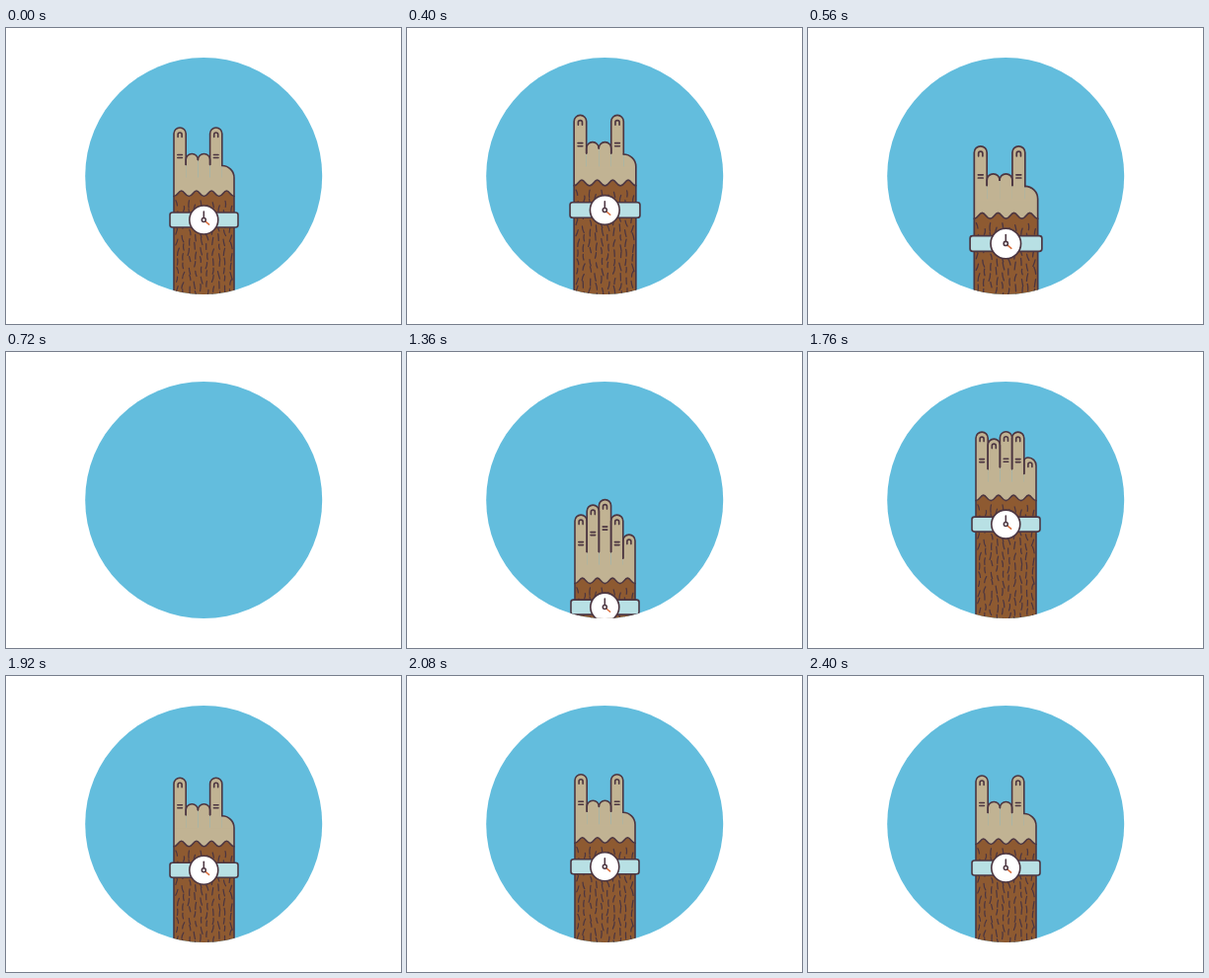
Animation of 400x300 px, one loop 3840 ms. Source, as an HTML page with a canvas:

```html
<!DOCTYPE html>
<html lang="en">
<head>
<meta charset="utf-8">
<title>Rock on</title>
<style>
html, body { margin: 0; width: 100%; height: 100%; overflow: hidden; background: #fff; }
canvas { display: block; width: 400px; height: 300px; }
</style>
</head>
<body>
<canvas id="stage"></canvas>
<script>
const LOOP = 3840, STEP = 40;
const INK = '#4c3641', SKIN = '#c1b393', FUR = '#8e5a31', SKY = '#63bddd';
const LEFT = 170, RIGHT = 231, MID = 200.5, W = (RIGHT - LEFT) / 5, ARM_END = 135;

const canvas = document.getElementById('stage');
const ctx = canvas.getContext('2d');
const dpr = window.devicePixelRatio || 1;
canvas.width = 400 * dpr;
canvas.height = 300 * dpr;

const sine = u => (1 - Math.cos(Math.PI * u)) / 2;
const cubic = u => u < 0.5 ? 4 * u ** 3 : 1 - 4 * (1 - u) ** 3;
const quadIn = u => u * u;
const quadOut = u => 1 - (1 - u) ** 2;
const mix = (a, b, u) => a + (b - a) * u;
const ramp = (t, a, b) => Math.min(1, Math.max(0, (t - a) / (b - a)));

// Height of the watch centre: start, end, from, to, easing
const MOVES = [
  [40, 200, 194.5, 195, sine],
  [320, 440, 195, 181, sine],
  [440, 720, 181, 385, quadIn],
  [1320, 1440, 390, 153.5, quadOut],
  [1440, 1560, 153.5, 180, sine],
  [1560, 1680, 180, 173, sine],
  [1720, 1880, 173, 198.5, cubic],
  [1880, 2000, 198.5, 191.5, sine],
  [2000, 2160, 191.5, 195, sine],
  [2160, 2400, 195, 194.5, sine]
];

function armY(t) {
  let y = 194.5;
  for (const [a, b, from, to, ease] of MOVES) {
    if (t >= a) y = mix(from, to, ease(ramp(t, a, b)));
  }
  return y;
}

// 0 is a straight finger, 1 a curled one
function curl(t, a, b) {
  return t < 1000 ? 1 : sine(ramp(t, a, b));
}

function line(x1, y1, x2, y2) {
  ctx.beginPath();
  ctx.moveTo(x1, y1);
  ctx.lineTo(x2, y2);
  ctx.stroke();
}

// Open-bottomed finger shape; rl and rr are the two corner radii
function fingerPath(f) {
  const { x, top, rl, rr } = f;
  ctx.beginPath();
  ctx.moveTo(x, Math.max(f.endL, top + rl));
  ctx.lineTo(x, top + rl);
  if (rl > 0) ctx.arc(x + rl, top + rl, rl, Math.PI, 1.5 * Math.PI);
  ctx.arc(x + W - rr, top + rr, rr, 1.5 * Math.PI, 2 * Math.PI);
  ctx.lineTo(x + W, Math.max(f.endR, top + rr));
}

function fingers(t) {
  const ring = curl(t, 1650, 1880);
  const middle = curl(t, 1670, 1890);
  const thumb = curl(t, 1680, 1890);
  const gap = mix(-56, -61, middle);
  const thumbGap = mix(-49.5, -55, thumb);
  const r = W / 2;
  const make = (i, top, bend, endL, endR, rl = r) =>
    ({ x: LEFT + W * i, top, bend, endL, endR, rl, rr: W - rl });
  return [
    make(0, -93.5, 0, ARM_END, -56),
    make(1, mix(-103.5, -67, ring), ring, -56, gap),
    make(2, mix(-109, -67, middle), middle, gap, -56),
    make(3, -93.5, 0, -56, thumbGap),
    make(4, mix(-73.5, -55, thumb), thumb, thumbGap, ARM_END, r * (1 - thumb))
  ];
}

function details(f, isThumb) {
  const x = f.x + W / 2, y = f.top;
  if (f.bend < 0.75) {
    ctx.beginPath();
    ctx.moveTo(x - 2, y + 9.5);
    ctx.lineTo(x - 2, y + 7);
    ctx.arc(x, y + 7, 2, Math.PI, 2 * Math.PI);
    ctx.lineTo(x + 2, y + 9.5);
    ctx.stroke();
  }
  if (isThumb) return;
  for (const d of [27.5, 30.5]) {
    if (y + d < -59) line(x - 2.3, y + d, x + 2.3, y + d);
  }
}

function furPath() {
  const n = 4, w = (RIGHT - LEFT) / n;
  ctx.moveTo(LEFT, -24);
  for (let i = 0; i < n; i++) {
    const x = LEFT + i * w;
    ctx.bezierCurveTo(x + w * 0.25, -24, x + w * 0.3, -29.5, x + w / 2, -29.5);
    ctx.bezierCurveTo(x + w * 0.7, -29.5, x + w * 0.75, -24, x + w, -24);
  }
}

function makeHairs() {
  let seed = 17;
  const rnd = () => (seed = (seed * 16807) % 2147483647) / 2147483647;
  const hairs = [];
  for (let c = 0; c < 10; c++) {
    for (let y = -19 + (c % 2) * 5; y < ARM_END; y += 9.5) {
      hairs.push({
        x: LEFT + 3.6 + c * 6 + (rnd() - 0.5) * 1.8,
        y: y + (rnd() - 0.5) * 3,
        lean: (rnd() - 0.5) * 4.5,
        bow: (rnd() - 0.5) * 4,
        len: 5 + rnd() * 2.5
      });
    }
  }
  return hairs;
}
const HAIRS = makeHairs();

function drawFur() {
  ctx.fillStyle = FUR;
  ctx.beginPath();
  furPath();
  ctx.lineTo(RIGHT, ARM_END);
  ctx.lineTo(LEFT, ARM_END);
  ctx.fill();

  ctx.beginPath();
  furPath();
  ctx.stroke();

  ctx.lineWidth = 1.25;
  ctx.beginPath();
  for (const h of HAIRS) {
    ctx.moveTo(h.x - h.lean / 2, h.y);
    ctx.quadraticCurveTo(h.x + h.bow / 2, h.y + h.len / 2, h.x + h.lean / 2, h.y + h.len);
  }
  ctx.stroke();
}

function drawHand(t) {
  const list = fingers(t);
  ctx.fillStyle = SKIN;
  ctx.fillRect(LEFT, -43, W * 5, 30);
  for (const f of list) {
    fingerPath(f);
    ctx.lineTo(f.x + W, -42);
    ctx.lineTo(f.x, -42);
    ctx.fill();
  }
  ctx.lineWidth = 1.6;
  drawFur();
  ctx.lineWidth = 1.6;
  list.forEach((f, i) => {
    fingerPath(f);
    ctx.stroke();
    details(f, i === 4);
  });
}

function drawWatch() {
  ctx.lineWidth = 1.6;
  ctx.fillStyle = '#b8e0e4';
  ctx.beginPath();
  ctx.roundRect(166, -7.5, 69, 15, 2.5);
  ctx.fill();
  ctx.stroke();

  ctx.fillStyle = '#fff';
  ctx.beginPath();
  ctx.arc(200.3, 0, 14.5, 0, 2 * Math.PI);
  ctx.fill();
  ctx.stroke();

  ctx.lineWidth = 1.5;
  line(200.3, -2, 200.3, -8.5);
  ctx.strokeStyle = '#d9703f';
  line(202, 1.6, 205.6, 4.6);
  ctx.strokeStyle = INK;
  ctx.beginPath();
  ctx.arc(200.3, 0, 2, 0, 2 * Math.PI);
  ctx.stroke();
}

function draw(t) {
  ctx.setTransform(dpr, 0, 0, dpr, 0, 0);
  ctx.fillStyle = '#fff';
  ctx.fillRect(0, 0, 400, 300);
  ctx.fillStyle = SKY;
  ctx.beginPath();
  ctx.arc(200.2, 150, 120, 0, 2 * Math.PI);
  ctx.fill();
  if (t >= 720 && t < 1360) return;

  const size = t < 720 ? 1 + 0.055 * sine(ramp(t, 320, 480)) : 1;
  ctx.save();
  ctx.clip();
  ctx.translate(MID, armY(t));
  ctx.scale(size, size);
  ctx.translate(-MID, 0);
  ctx.strokeStyle = INK;
  ctx.lineCap = 'round';
  ctx.lineJoin = 'round';
  drawHand(t);
  drawWatch();
  ctx.restore();
}

const start = performance.now();
function tick() {
  const t = (performance.now() - start) % LOOP;
  draw(Math.floor(t / STEP) * STEP);
  requestAnimationFrame(tick);
}
tick();
</script>
</body>
</html>
```
